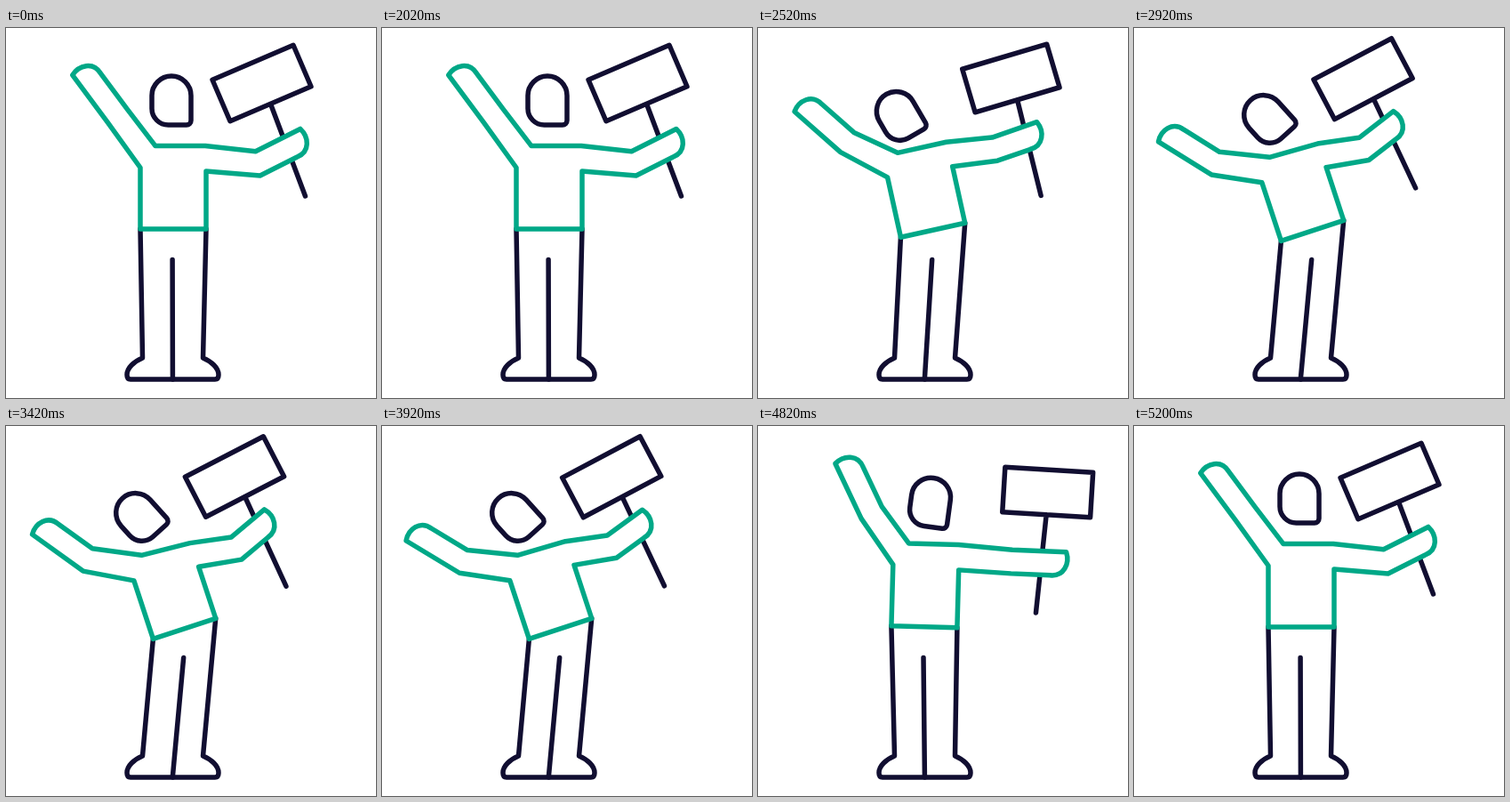
Animation, 416 px wide and 416 px high, one loop 5.22 s. Source, as an HTML page with a canvas:

```html
<!DOCTYPE html>
<html lang="en">
<head>
<meta charset="utf-8">
<title>Waving protester</title>
<style>
  html, body { margin: 0; width: 100%; height: 100%; overflow: hidden; background: #fff; }
  canvas { display: block; width: 100vmin; height: 100vmin; }
</style>
</head>
<body>
<canvas id="stage" width="416" height="416"></canvas>
<script>
const ctx = document.getElementById('stage').getContext('2d');
const LOOP = 5220, DARK = '#110e31', GREEN = '#00a887';

// All angles are in degrees. l = left arm, r = right arm; shrug lowers the right shoulder.
const rest = {
  lean: 0, head: 0, dip: 0, shrug: 0,
  lUpper: 233.4, lFore: 233.4, rUpper: 5.5, rFore: -26.8,
  signX: 287.5, signY: 62, sign: -23.2
};
const tilt = {
  lean: -12.4, head: -30, dip: 5, shrug: 0,
  lUpper: 206.7, lFore: 221.5, rUpper: -6.6, rFore: -19,
  signX: 284.5, signY: 56.5, sign: -16.4
};
const low = {
  lean: -18.2, head: -42, dip: 0, shrug: 0,
  lUpper: 185.3, lFore: 206.6, rUpper: -8.9, rFore: -32.4,
  signX: 259.4, signY: 57.5, sign: -28.5
};
const high = {
  ...low, shrug: 4, lUpper: 189.2, lFore: 215.8, rFore: -40,
  signX: 257, signY: 57, sign: -27.3
};
const swing = {
  lean: 2.5, head: 10, dip: 5, shrug: 0,
  lUpper: 237, lFore: 246.5, rUpper: 5.4, rFore: 3.7,
  signX: 328.7, signY: 75.3, sign: 5
};

const keys = [[0, rest], [2020, rest], [2230, swing], [2520, tilt], [2800, low]];
for (let t = 3020, up = true; t <= 4420; t += 200, up = !up) keys.push([t, up ? high : low]);
keys.push([4880, swing], [5200, rest], [LOOP, rest]);

// Slope of a monotone curve through key i: flat at every extreme.
function slope(i, part) {
  if (i === 0 || i === keys.length - 1) return 0;
  const rate = j => (keys[j + 1][1][part] - keys[j][1][part]) / (keys[j + 1][0] - keys[j][0]);
  const a = rate(i - 1), b = rate(i);
  return a * b <= 0 ? 0 : 2 * a * b / (a + b);
}

function poseAt(t) {
  let i = 0;
  while (i < keys.length - 2 && t >= keys[i + 1][0]) i++;
  const [t0, a] = keys[i], [t1, b] = keys[i + 1];
  const span = t1 - t0, u = (t - t0) / span, s = u * u * (3 - 2 * u);
  const pose = {};
  for (const part in a) {
    pose[part] = a[part] + (b[part] - a[part]) * s
      + span * u * (1 - u) * ((1 - u) * slope(i, part) - u * slope(i + 1, part));
  }
  return pose;
}

// The point (x, y) turned by deg and moved to an origin.
function turn([ox, oy], deg, x, y) {
  const a = deg * Math.PI / 180, c = Math.cos(a), s = Math.sin(a);
  return [ox + x * c - y * s, oy + x * s + y * c];
}

function line(...points) {
  ctx.beginPath();
  for (const p of points) ctx.lineTo(...p);
}

function placed([x, y], deg, draw) {
  ctx.save();
  ctx.translate(x, y);
  ctx.rotate(deg * Math.PI / 180);
  draw();
  ctx.stroke();
  ctx.restore();
}

function shoe(side) {
  const x = d => 187.5 + side * d;
  const heel = [[x(34), 371], [x(43.5), 375], [x(51.5), 382], [x(51.5), 390]];
  return { heel, toe: [x(51.5), 395], sole: [x(47.5), 395] };
}

function drawLegs(hipL, hipR) {
  for (const [side, hip] of [[-1, hipL], [1, hipR]]) {
    const { heel, toe, sole } = shoe(side);
    line(hip, heel[0]);
    ctx.bezierCurveTo(...heel[1], ...heel[2], ...heel[3]);
    ctx.quadraticCurveTo(...toe, ...sole);
    ctx.lineTo(187.5, 395);
    ctx.stroke();
  }
  line([(hipL[0] + hipR[0]) / 2 - 0.9, 260.5], [187.4, 394]);
  ctx.stroke();
}

function drawSign() {
  line([0, 25.3], [-5, 136]);
  ctx.rect(-49.5, -25.3, 99, 50.6);
}

function drawHead() {
  ctx.beginPath();
  ctx.arc(0, -5, 22, Math.PI, 0);
  ctx.arcTo(22, 28, 0, 28, 5);
  ctx.arcTo(-22, 28, -22, 0, 18.5);
  ctx.closePath();
}

// Sleeve of even width with a mitred elbow and a slanted, rounded hand.
function sleeve(shoulder, upper, upperLen, fore, foreLen) {
  const half = 13.3, slant = 8.7;
  const elbow = turn(shoulder, upper, upperLen, 0);
  const hand = turn(elbow, fore, foreLen, 0);
  const bend = (fore - upper) / 2, mitre = half / Math.cos(bend * Math.PI / 180);
  const [x0, y0] = turn(hand, fore, -slant, half);
  const [x1, y1] = turn(hand, fore, slant, -half);
  const dx = x1 - x0, dy = y1 - y0;
  const bulge = (a, b) => [x0 + a * dx - b * dy, y0 + a * dy + b * dx];

  ctx.lineTo(...turn(elbow, upper + bend, 0, mitre));
  ctx.lineTo(x0, y0);
  ctx.bezierCurveTo(...bulge(0.24, 0.44), ...bulge(0.75, 0.34), x1, y1);
  ctx.lineTo(...turn(elbow, upper + bend, 0, -mitre));
}

function drawShirt(p, body) {
  const drop = p.shrug;
  line(body(-37, 0), body(37, 0), body(37, -65 + drop));
  sleeve(body(36.6, -79.2 + drop), p.rUpper, 58.8 + 0.6 * p.lean, p.rFore, 51.5 + 0.45 * p.lean);
  ctx.lineTo(...body(36, -93.4 + drop));
  ctx.lineTo(...body(-20, -93.4));
  sleeve(body(-28.5, -81.2), p.lUpper, 57, p.lFore, 58.6);
  ctx.lineTo(...body(-37, -69));
  ctx.closePath();
  ctx.fillStyle = '#fff';
  ctx.fill();
  ctx.stroke();
}

function draw(p) {
  const hip = [188 - 0.69 * p.lean, 226 - 0.1 * p.lean];
  const body = (x, y) => turn(hip, p.lean, x, y);
  const neck = [194, 139.3 + p.dip];

  ctx.fillStyle = '#fff';
  ctx.fillRect(0, 0, 416, 416);
  ctx.lineWidth = 5.5;
  ctx.lineCap = ctx.lineJoin = 'round';
  ctx.strokeStyle = DARK;
  drawLegs(body(-37, 0), body(37, 0));
  placed([p.signX, p.signY], p.sign, drawSign);
  placed(turn(neck, p.head, -8, -58.3), p.head, drawHead);
  ctx.strokeStyle = GREEN;
  drawShirt(p, body);
}

const start = performance.now();
function frame(now) {
  draw(poseAt(Math.max(0, now - start) % LOOP));
  requestAnimationFrame(frame);
}
requestAnimationFrame(frame);
</script>
</body>
</html>
```
